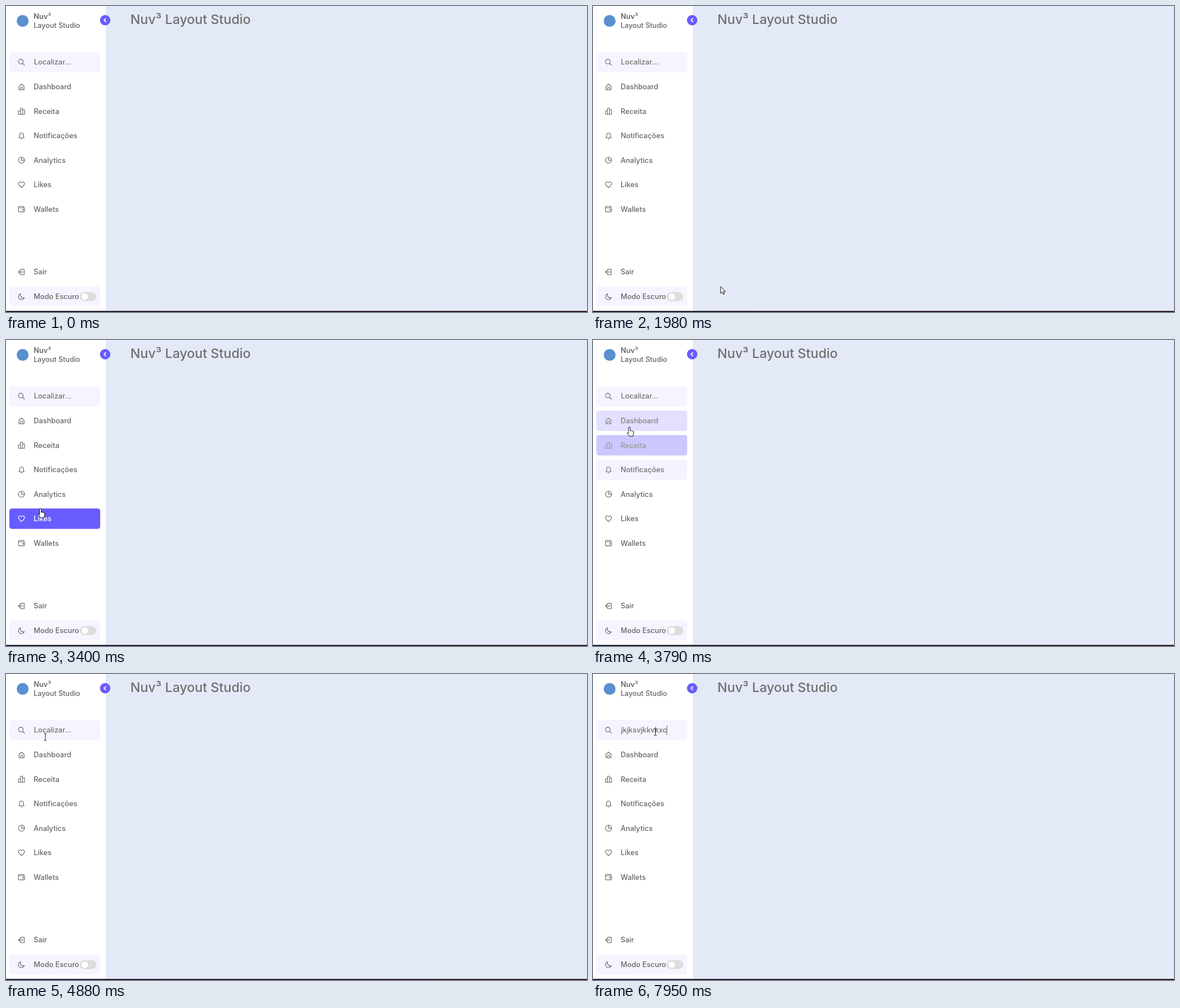
These frames come from a looping animation (1030x544 px, 8000 ms). An HTML page:

```html
<!DOCTYPE html>
<html lang="pt">
<head>
<meta charset="utf-8">
<title>Painel</title>
<style>
html, body { margin: 0; width: 100%; height: 100%; overflow: hidden; background: #e4e9f7; }
svg { display: block; width: 1030px; height: 544px; font: 500 12.8px Inter, sans-serif; fill: #666; }
.icon { fill: none; stroke: #666; stroke-width: 1.9; stroke-linejoin: round; stroke-linecap: round; }
.pointer { fill: #fff; stroke: #111; stroke-width: 1; stroke-linejoin: round; }
</style>
</head>
<body>
<svg id="stage" viewBox="0 0 1030 544" xmlns="http://www.w3.org/2000/svg">
  <defs>
    <linearGradient id="edge"><stop offset="0" stop-color="#1d1b30"/><stop offset="1" stop-color="#321b20"/></linearGradient>
  </defs>
  <rect width="1030" height="544" fill="#e4e9f7"/>
  <rect width="177" height="544" fill="#fff"/>
  <circle cx="29.5" cy="26.5" r="10.5" fill="#5a8fd0"/>
  <text x="49" y="22.5" font-weight="600">Nuv³</text>
  <text x="49" y="39.3" font-size="12.6">Layout Studio</text>
  <text x="220.5" y="32" font-size="23.2" fill="#707070">Nuv³ Layout Studio</text>
  <circle cx="175.8" cy="25.2" r="9.2" fill="#695cfe"/>
  <path d="M177.3 21.8l-3.4 3.4 3.4 3.4" fill="none" stroke="#fff" stroke-width="1.7"/>
  <rect x="6" y="82" width="161" height="36.3" rx="4.5" fill="#f6f5ff"/>
  <rect x="6" y="498.3" width="161" height="36.3" rx="4.5" fill="#f6f5ff"/>
  <g id="menu"></g>
  <rect x="130.5" y="508.7" width="29.5" height="16" rx="8" fill="#ddd"/>
  <circle cx="139.6" cy="516.7" r="5.8" fill="#fff"/>
  <text id="field" x="49.5" y="104.3" fill="#707070"></text>
  <rect id="caret" y="91.5" width="1" height="17" fill="#555"/>
  <rect y="542" width="1030" height="2" fill="url(#edge)"/>
  <g id="status">
    <path d="M0 527H104a3 3 0 0 1 3 3V542H0z" fill="#000"/>
    <text x="0" y="537.5" font-family="Open Sans, sans-serif" font-weight="400" font-size="8.1" fill="#eee">127.0.0.1:5500/index.html#</text>
  </g>
  <g id="cursor">
    <path id="arrow" class="pointer" d="M.5 0V12.2L3.4 9.6 5.3 14 7.3 13.1 5.4 8.9H9z"/>
    <path id="hand" class="pointer" d="M-1.5 8V1a1.5 1.5 0 0 1 3 0V6.3l1.2-.6 1.3.8 1.3-.3 1 1 1.2.2V11l-1.3 5H.3L-4 10.5q.8-2 2.5 0z"/>
    <path id="beam" fill="none" d="M-2.5-6H-.5L0-5.5.5-6H2.5M0-5.5V5.5M-2.5 6H-.5L0 5.5.5 6H2.5"/>
  </g>
</svg>
<script>
const LOOP = 8000, FADE = 300;
const NS = 'http://www.w3.org/2000/svg';
const $ = id => document.getElementById(id);

// label, vertical centre, icon on a 24 unit grid
const ITEMS = [
  ['', 100, 'M17 10a7 7 0 1 1-14 0a7 7 0 0 1 14 0zM15.2 15.2L21 21'],
  ['Dashboard', 143.6, 'M4.5 21V10.5L12 4l7.5 6.5V21zM9 21v-5a3 3 0 0 1 6 0v5'],
  ['Receita', 187.1, 'M3 21V11h6v10M9 21V3h6v18M15 8h6v13H3'],
  ['Notificações', 230.6, 'M4.5 18v-1l2-2v-5.500a5.500 5.500 0 0 1 11 0V15l2 2v1zM10 21.500h4'],
  ['Analytics', 274.1, 'M21 12a9 9 0 1 1-18 0a9 9 0 0 1 18 0zM12 3v9h9'],
  ['Likes', 317.6, 'M12 20.5C8 17 3 13 3 8.8A4.800 4.800 0 0 1 12 6.500A4.800 4.800 0 0 1 21 8.800C21 13 16 17 12 20.500z'],
  ['Wallets', 361.1, 'M3 5.500V18a2 2 0 0 0 2 2h14a2 2 0 0 0 2-2V10a2 2 0 0 0-2-2H5A2 2 0 0 1 5 4H19v4M16 12.500h1.500v3H16z'],
  ['Sair', 472.9, 'M9 8V5a1 1 0 0 1 1-1h10v16H10a1 1 0 0 1-1-1v-3M16 12H3M7 8l-4 4l4 4'],
  ['Modo Escuro', 516.6, 'M20.500 15A9 9 0 1 1 9.500 3.500A8.500 8.500 0 0 0 20.500 15z']
];

// time, x, y
const PATH = [
  [960, 950, 536], [1150, 800, 506], [1400, 520, 494], [1750, 280, 492],
  [1980, 226, 499], [2300, 160, 432], [2470, 118, 379], [2560, 110, 373],
  [2700, 99.7, 360.5], [3000, 86, 338], [3200, 75, 324], [3400, 61, 300.5],
  [3740, 66, 162], [4010, 58, 125.5], [4170, 56, 106.5], [4320, 60, 104],
  [4490, 111, 103], [4640, 111, 103], [4800, 60, 104], [4950, 78, 118.8],
  [5100, 120, 107], [5270, 113, 101], [5430, 113, 101], [5600, 110.5, 103]
];

const TYPED = 'jkjksvjkkvkxc';
// time, number of letters typed
const KEYS = [[7080, 2], [7320, 4], [7390, 5], [7550, 8], [7700, 9], [7780, 10], [7860, 11], [7950, 13]];

const clamp = v => Math.max(0, Math.min(1, v));

// cubic-bezier(.25, .1, .25, 1)
function ease(p) {
  p = clamp(p);
  let lo = 0, hi = 1;
  for (let i = 0; i < 16; i++) {
    const s = (lo + hi) / 2, r = 1 - s;
    if (.75 * r * r * s + .75 * r * s * s + s ** 3 < p) lo = s; else hi = s;
  }
  const r = 1 - lo;
  return .3 * r * r * lo + 3 * r * lo * lo + lo ** 3;
}

function pointAt(t) {
  const i = PATH.findIndex(k => k[0] > t);
  if (i < 0) return PATH[PATH.length - 1].slice(1);
  if (i === 0) return PATH[0].slice(1);
  const [t0, x0, y0] = PATH[i - 1], [t1, x1, y1] = PATH[i];
  const p = (t - t0) / (t1 - t0);
  return [x0 + (x1 - x0) * p, y0 + (y1 - y0) * p];
}

const inside = ([x, y], cy) => x >= 6 && x <= 167 && Math.abs(y - cy) <= 18.1;

const mix = (a, b, p) => `rgb(${a.map((v, i) => Math.round(v + (b[i] - v) * p))})`;

function add(tag, attrs, parent) {
  const el = document.createElementNS(NS, tag);
  for (const k in attrs) el.setAttribute(k, attrs[k]);
  return parent.appendChild(el);
}

const rows = ITEMS.map(([label, cy, d], i) => {
  const g = add('g', {}, $('menu'));
  const back = add('rect', { x: 6, y: cy - 18.1, width: 161, height: 36.3, rx: 4.5, fill: '#695cfe', opacity: 0 }, g);
  const icon = add('path', { class: 'icon', d, transform: `translate(20.3 ${cy - 7.2}) scale(.6)` }, g);
  const text = add('text', { x: 49, y: cy + 4.4 }, g);
  text.textContent = label;
  const row = { cy, back, icon, text, link: i > 0 && i < 8, enter: null, leave: null };
  if (row.link) {
    for (let t = 960; t < 5600; t += 5) {
      const on = inside(pointAt(t), cy);
      if (on && row.enter === null) row.enter = t;
      if (!on && row.enter !== null && row.leave === null) row.leave = t;
    }
  }
  return row;
});

function level(row, t) {
  if (row.enter === null || t < row.enter) return 0;
  const up = ease((Math.min(t, row.leave) - row.enter) / FADE);
  return t < row.leave ? up : up * (1 - ease((t - row.leave) / FADE));
}

const show = (id, on) => $(id).setAttribute('visibility', on ? 'visible' : 'hidden');

function draw(t) {
  for (const row of rows) {
    if (!row.link) continue;
    const p = level(row, t), ink = mix([102, 102, 102], [255, 255, 255], p);
    row.back.setAttribute('opacity', p);
    row.icon.style.stroke = ink;
    row.text.setAttribute('fill', ink);
  }

  const pos = pointAt(t), moving = t >= 960;
  const beam = inside(pos, 100);
  const hand = !beam && rows.some(r => r.link && inside(pos, r.cy));
  $('cursor').setAttribute('transform', `translate(${pos})`);
  $('beam').setAttribute('stroke', t < 4250 ? '#3fae5a' : '#222');
  show('beam', moving && beam);
  show('hand', moving && hand);
  show('arrow', moving && !beam && !hand);

  $('status').setAttribute('opacity', clamp((t - 3860) / 100) * clamp((4490 - t) / 170));

  const count = KEYS.reduce((n, [at, c]) => t >= at ? c : n, 0);
  const field = $('field');
  const value = count ? TYPED.slice(0, count) : 'Localizar...';
  if (field.textContent !== value) field.textContent = value;
  $('caret').setAttribute('x', 49 + (count ? field.getComputedTextLength() : 0));
  show('caret', (t >= 5600 && t < 6130) || t >= 6690);
}

let start = null;
function tick() {
  const now = performance.now();
  if (start === null) start = now;
  draw((now - start) % LOOP);
  requestAnimationFrame(tick);
}
tick();
</script>
</body>
</html>
```
